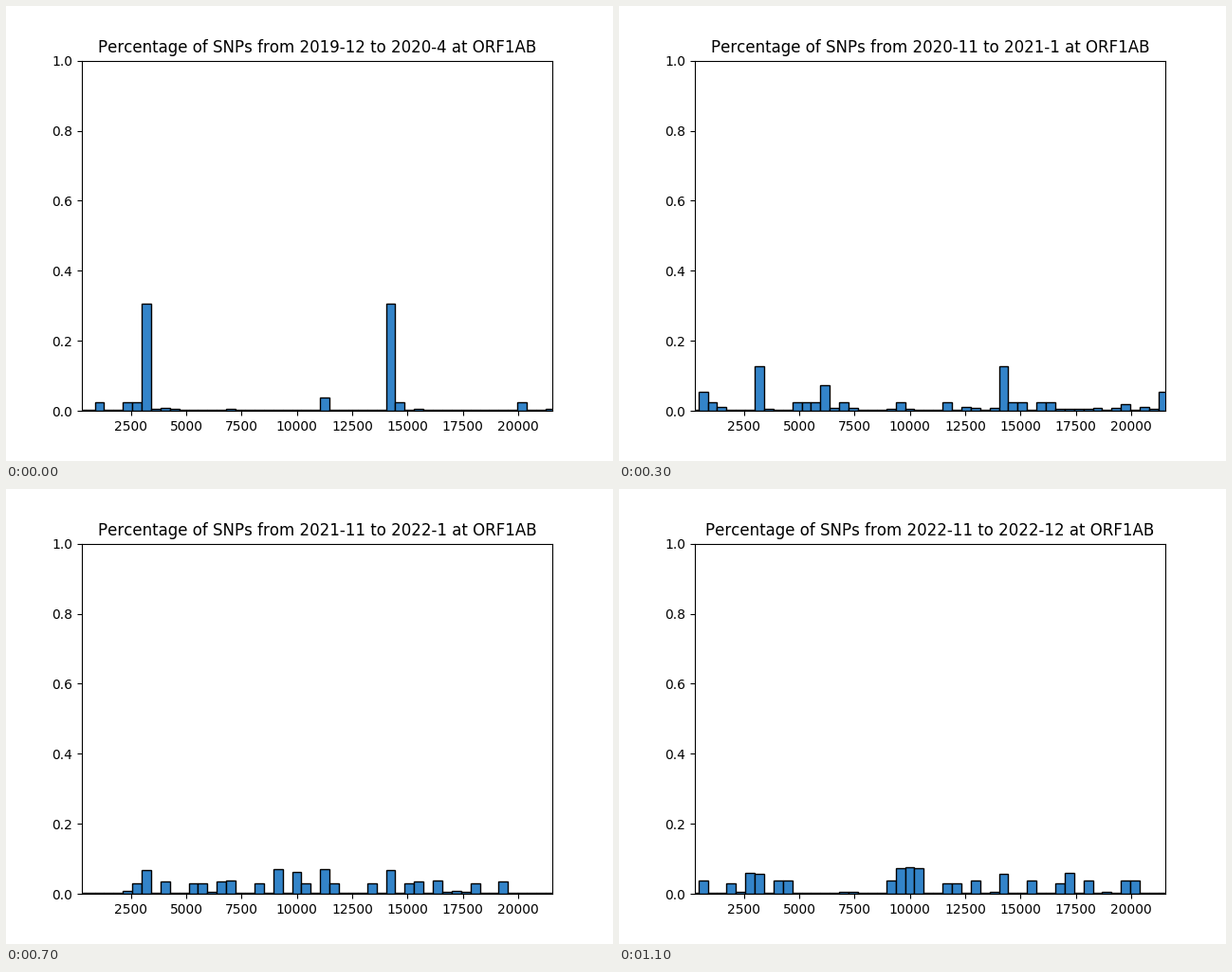
A matplotlib script that plays this animation: 640 px wide and 480 px high, repeating every 1.2 s.

```python
import matplotlib.pyplot as plt
import numpy as np
from matplotlib.animation import FuncAnimation

plt.rcParams["text.kerning_factor"] = 6

GENE_START, GENE_END = 270, 21555
BIN_WIDTH = 425
BINS = 51
FOUNDERS = [7, 33]  # bins mutated since the start

# first period, last period, share, change per period, bins
WAVES = [
    (0, 0, 0.024, 1, [2, 5, 6, 34, 47]),
    (0, 0, 0.038, 1, [26]),
    (2, 2, 0.168, 1, [2, 15, 16]),
    (2, 2, 0.057, 1, [41]),
    (3, 3, 0.024, 1, [2, 11, 12, 13, 16, 22, 27, 34, 35, 37, 38]),
    (3, 3, 0.055, 1, [1, 50]),
    (3, 3, 0.073, 1, [14]),
    (5, 7, 0.087, 0.9, [21, 26]),
    (5, 7, 0.062, 0.8, [16, 38]),
    (5, 7, 0.046, 0.88, [9, 15, 36, 45]),
    (5, 7, 0.046, 1.16, [23]),
    (5, 7, 0.022, 1.15, [12, 24, 35]),
    (7, 7, 0.029, 1, [6, 13, 19, 27, 31, 42]),
    (8, 11, 0.038, 1, [1, 9, 10, 21, 30, 36, 42, 46, 47]),
    (8, 11, 0.05, 1.06, [6, 40]),
    (8, 11, 0.085, 0.95, [22, 24]),
    (8, 11, 0.119, 0.86, [23]),
    (11, 11, 0.031, 1, [4, 27, 28, 39]),
]

PERIODS = ["2019-12 to 2020-4"]
for month in range(4, 35, 3):  # months counted from January 2020
    last = min(month + 2, 35)
    PERIODS.append(" to ".join(f"{2020 + m // 12}-{m % 12 + 1}"
                               for m in (month, last)))


def shares(period):
    """Share of SNPs in each bin: rare noise, founders and passing waves."""
    rng = np.random.default_rng(period)
    level = 0.001 + 0.005 * np.exp(-((period - 4.5) / 2) ** 2)
    share = 0.002 + rng.exponential(level, BINS)
    share[0] = 0.002
    share[FOUNDERS] = 0.055 + 0.25 * np.exp(-period / 2.4)
    for first, last, height, change, bins in WAVES:
        if first <= period <= last:
            share[bins] = height * change ** (period - first)
    return share


fig, ax = plt.subplots(figsize=(6.4, 4.8), dpi=100)
bars = ax.bar(1 + np.arange(BINS) * BIN_WIDTH, shares(0), width=BIN_WIDTH,
              align="edge", color="#3384c9", edgecolor="black", linewidth=1)
ax.set_xlim(GENE_START, GENE_END)
ax.set_ylim(0, 1)
title = ax.set_title("")


def update(i):
    for bar, share in zip(bars, shares(i)):
        bar.set_height(share)
    title.set_text(f"Percentage of SNPs from {PERIODS[i]} at ORF1AB")
    return [*bars, title]


anim = FuncAnimation(fig, update, frames=len(PERIODS), interval=100,
                     repeat=True, repeat_delay=0)
plt.show()
```
